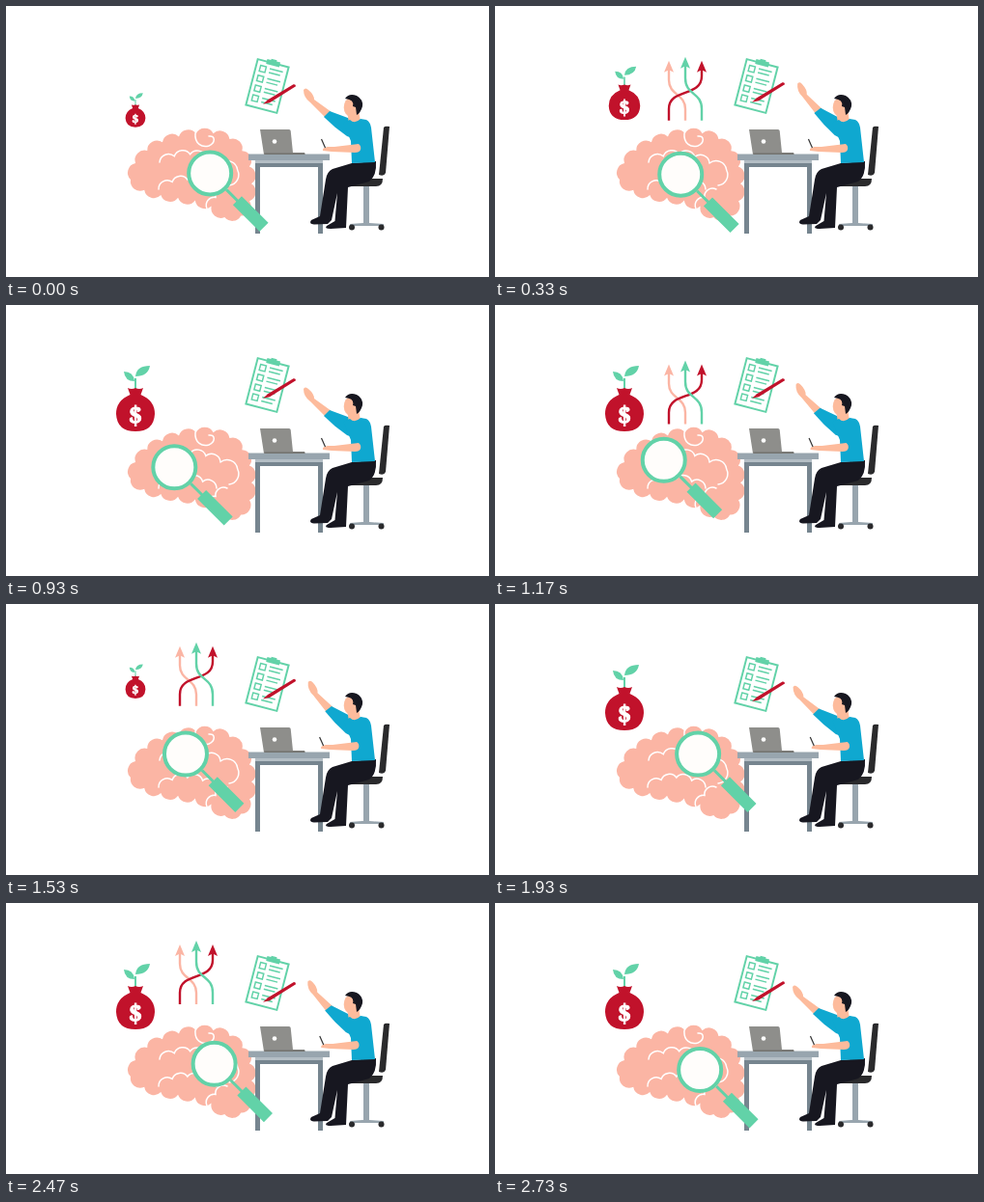
Recreate the animation shown at these times as an HTML page. Size 500 px wide and 281 px high, loop 2.76 s.

```html
<!DOCTYPE html>
<html lang="en">
<head>
<meta charset="utf-8">
<title>Planning desk</title>
<style>
  html, body { margin: 0; width: 100%; height: 100%; overflow: hidden; background: #fff; }
  svg { display: block; width: 100%; height: 100%; }
  .pink { fill: #fbb5a4; }
  .green { fill: #62d2a8; }
  .red { fill: #c1122b; }
  .skin { fill: #fdbb9c; }
  .cyan { fill: #0fa8d0; }
  .dark { fill: #2a2a2c; }
  .ink { fill: #171720; }
  .line { fill: none; stroke-width: 2; }
  text { font: 900 25px "Noto Serif", "Liberation Serif", serif; fill: #fff; stroke: #fff; text-anchor: middle; }
</style>
</head>
<body>
<svg viewBox="0 0 500 281">
  <g id="arrows">
    <g class="line" style="stroke-width:2.400">
      <path stroke="#fbb5a4" d="M180 12V24C180 40 197 38 197 54V66"/>
      <path stroke="#c1122b" d="M214 12V20C214 42 180 32 180 54V66"/>
      <path stroke="#62d2a8" d="M197 8V22C197 40 214 36 214 54V66"/>
    </g>
    <path class="pink" d="M180 4l5 12l-5 -2.500l-5 2.500Z"/>
    <path class="green" d="M197 0l5 12l-5 -2.500l-5 2.500Z"/>
    <path class="red" d="M214 4l5 12l-5 -2.500l-5 2.500Z"/>
  </g>

  <g id="bag">
    <path class="line" stroke="#62d2a8" d="M0 26V14"/>
    <path class="green" d="M0 12Q1 1 15 1Q13 12 0 12ZM-1 17Q-11 17 -12 7Q-2 7 -1 17Z"/>
    <path class="red" d="M-8 24Q-4 26 0 24Q4 26 8 24L5.500 31Q20 37 20 51Q19 69 0 69Q-19 69 -20 51Q-20 37 -5.500 31Z"/>
    <text y="61">$</text>
  </g>

  <path id="brain" class="pink"/>
  <path id="folds" class="line" stroke="#fff" style="stroke-width:1.500" stroke-linecap="round"/>

  <g fill="#76858f">
    <path d="M258 162H328V236H323V167H263V236H258Z"/>
    <path fill="#98a5ae" d="M251 153.500H335V160H251Z"/>
    <path fill="#b4bec5" d="M258 160H328V163H258Z"/>
  </g>
  <path fill="#8e8e8b" d="M263 128H293Q294.500 128 294.700 129.500L297 152H309V154H267Z"/>
  <path fill="#73736f" d="M267 152.500H309.500V154H268Z"/>
  <circle cx="278" cy="140.500" r="2.300" fill="#fff"/>

  <g transform="translate(270.500 83) rotate(14.500)">
    <rect class="line" x="-16.500" y="-24.500" width="33" height="49" style="fill:#fff" stroke="#62d2a8"/>
    <path class="green" d="M-7 -27H-3V-28.500H3V-27H7V-22H-7Z"/>
    <g id="rows" class="line" stroke="#62d2a8" style="stroke-width:1.500"></g>
  </g>
  <path id="pen" class="red" d="M266 102L271 97.500L297.500 81.500Q300 81 300 83.500L273 100.500Z"/>

  <path class="dark" d="M391 126Q392 124 397 125L393 173Q391.500 177 386 175Z"/>
  <path class="dark" d="M352 179H390Q390 187 383 187H356Q352 185 352 179Z"/>
  <path fill="#98a5ae" d="M370 187H376V225L391 226V228H356V226L370 225Z"/>
  <circle class="dark" cx="358" cy="229.500" r="3"/>
  <circle class="dark" cx="388.500" cy="229.500" r="3"/>

  <path class="ink" d="M383 161L358 163L338 169Q332 172 331 180L325 218L316 222Q313 226 319 226.500L333 226L337 222L343 194L340.500 223L332 228Q329 231 336 231L352 230L354 188L376 182Q384 176 383 161Z"/>
  <g id="wave">
    <path class="skin" d="M330 115L315 100Q308 95 308 87Q310 84 313 87Q319 92 319 97L337 110Z"/>
    <path class="cyan" d="M329 115L335 109L362 119L361 138L353 135Q340 126 329 115Z"/>
  </g>
  <path class="skin" d="M353 108L365 107L367 120L355 122Z"/>
  <path class="cyan" d="M349 121L356 118Q361 123 367 117L373 118Q377 120 378 126L382 162L358 163L357 140Z"/>
  <ellipse class="skin" cx="356.500" cy="105" rx="6.800" ry="9.500"/>
  <path class="ink" d="M351 96Q355 90 363 93Q370 97 369 104Q367 111 363 113L362 105L359 104Q361 97 351 96Z"/>
  <g id="write">
    <path class="skin" d="M365 143Q368 145 367 149Q366 152 361 152L337 151L328 150Q327 147 333 146L340 146Z"/>
    <path stroke="#333" stroke-width="1.200" d="M326.500 138L330.500 147"/>
  </g>

  <g id="glass">
    <circle r="22" fill="#fffdfb" stroke="#62d2a8" stroke-width="4"/>
    <path class="green" transform="rotate(45)" d="M24 -1.500H40V-6.400H79V6.400H40V1.500H24Z"/>
  </g>
</svg>
<script>
const LOOP = 2760;
const $ = id => document.getElementById(id);
const place = (id, value) => $(id).setAttribute("transform", value);
const clamp = v => Math.min(1, Math.max(0, v));
const turn = (t, period = LOOP) => 2 * Math.PI * t / period;
const wave = (t, period) => (1 - Math.cos(turn(t, period))) / 2;

// A row of equal bumps along a smooth guide curve
function scallop(guide, count) {
  const path = document.createElementNS("http://www.w3.org/2000/svg", "path");
  path.setAttribute("d", guide);
  const step = path.getTotalLength() / count, r = step * 0.56;
  let d = "";
  for (let i = 0; i <= count; i++) {
    const { x, y } = path.getPointAtLength(i * step);
    d += i ? `A${r} ${r} 0 0 1 ${x} ${y}` : `M${x} ${y}`;
  }
  return d;
}

$("brain").setAttribute("d",
  scallop("M129 180C130 152 162 136 200 132C240 128 255 160 254 185C254 224 230 228 218 212C200 192 150 206 129 180", 19));
$("folds").setAttribute("d",
  "M196 132C195 143 203 147 210 145C217 142 217 134 210 135" +
  scallop("M159 162Q190 145 222 163", 4) +
  scallop("M222 163Q254 168 231 186", 2) +
  scallop("M158 190Q185 170 218 190", 4) +
  scallop("M208 210Q212 200 229 190", 2));

let rows = "";
for (let y = -19; y < 15; y += 10.5)
  rows += `<path d="M-12 ${y}h6v6h-6zM-2 ${y + 1}h14M-2 ${y + 5}h12"/>`;
$("rows").innerHTML = rows;

// Slightly squared circular motion, from -0.9 to 0.9
const squared = a => Math.sin(a) + 0.1 * Math.sin(3 * a);

function draw() {
  const t = performance.now() % LOOP;

  const rise = t % 920;
  $("arrows").style.display = rise >= 215 && rise < 675 ? "" : "none";
  place("arrows", `translate(0 ${38 + 19.5 * clamp((675 - rise) / 425) ** 1.3})`);

  const pop = t % 1380;
  const top = 62 + 28 * clamp(1 - pop / 150);
  const size = 0.52 + 0.48 * clamp((pop - 160) / 280);
  place("bag", `translate(134 ${top}) scale(${size})`);

  const lift = wave(t, 920);
  place("wave", `rotate(${9 * lift} 361 124)`);
  place("write", `translate(${-2.5 * lift} 0)`);
  place("pen", `translate(0 ${0.7 - 6 * wave(t + 350, LOOP)})`);

  const x = 195 + 23 * squared(turn(t + 1090));
  const y = 165 + 10.8 * squared(turn(t + 345));
  place("glass", `translate(${x} ${y})`);
  requestAnimationFrame(draw);
}
draw();
</script>
</body>
</html>
```
